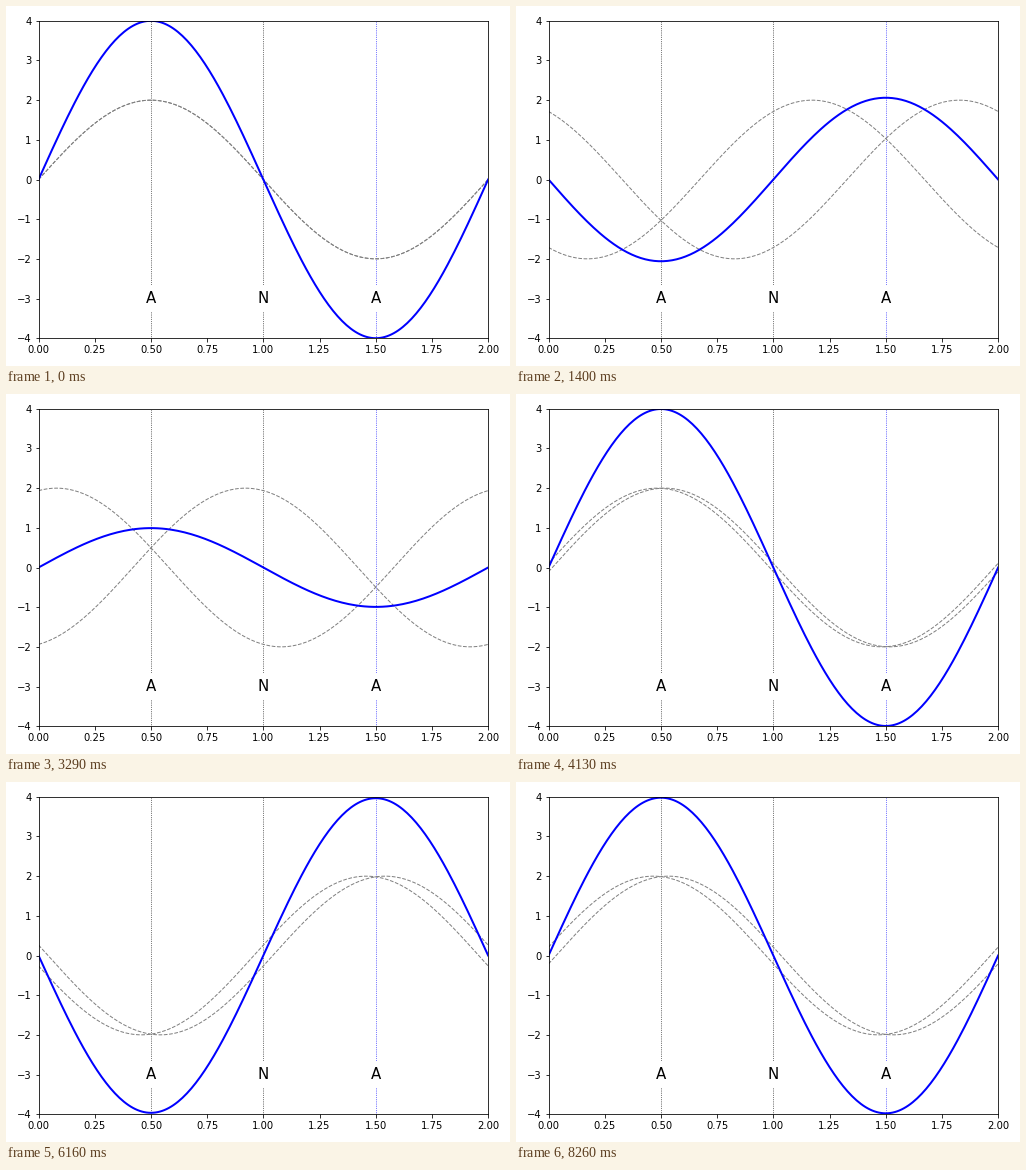
These frames come from a looping animation (504 px wide and 360 px high, 8330 ms). A matplotlib script:

```python
import numpy as np
import matplotlib.pyplot as plt
from matplotlib.animation import FuncAnimation

FRAMES, INTERVAL = 119, 70
AMP = 2

x = np.linspace(0, 2, 201)

fig, ax = plt.subplots(figsize=(7, 5), dpi=72)
ax.set_xlim(0, 2)
ax.set_ylim(-4, 4)

for pos, label, color in [(0.5, "A", "black"), (1, "N", "black"), (1.5, "A", "blue")]:
    ax.axvline(pos, color=color, ls=":", lw=0.7)
    ax.text(pos, -3, label, fontsize=15, ha="center", va="center",
            bbox=dict(boxstyle="square,pad=0.4", fc="white", ec="none"))

right, = ax.plot([], [], color="gray", ls="--", lw=1)
left, = ax.plot([], [], color="gray", ls="--", lw=1)
total, = ax.plot([], [], color="blue", lw=2)
fig.tight_layout()


def update(i):
    phase = 4 * np.pi * i / FRAMES
    y1 = AMP * np.sin(np.pi * x - phase)
    y2 = AMP * np.sin(np.pi * x + phase)
    right.set_data(x, y1)
    left.set_data(x, y2)
    total.set_data(x, y1 + y2)
    return right, left, total


anim = FuncAnimation(fig, update, frames=FRAMES, interval=INTERVAL,
                     repeat=True, repeat_delay=0)
plt.show()
```
